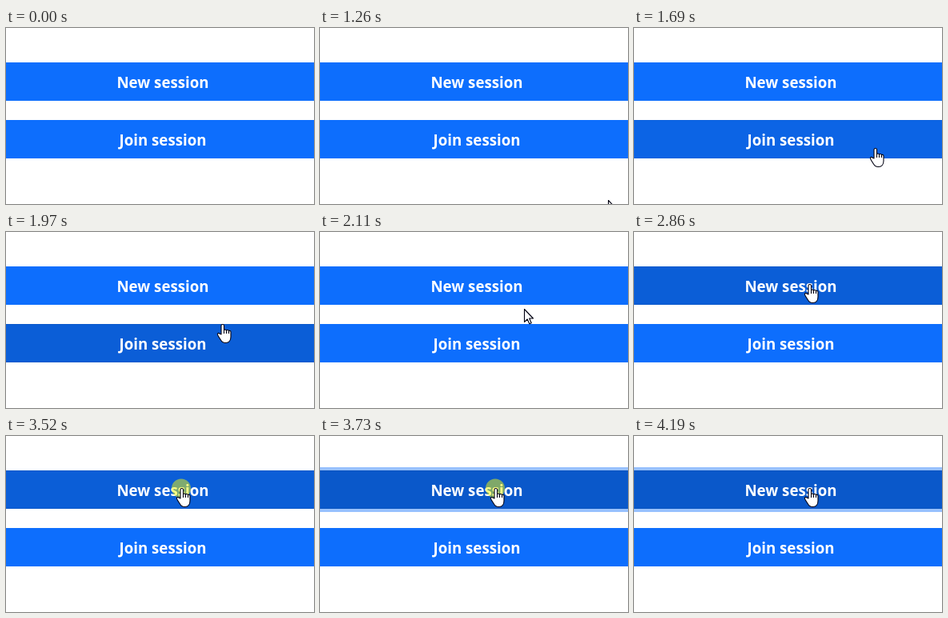
Recreate the animation shown at these times as an HTML page. Size 385 by 220 pixels, loop 4.26 s.

```html
<!DOCTYPE html>
<html lang="en">
<head>
<meta charset="utf-8">
<title>Session buttons</title>
<style>
  html, body { margin: 0; width: 100%; height: 100%; overflow: hidden; background: #fff; }
  svg { display: block; width: 100%; height: 100%; }
  text { font: 700 18.7px "Open Sans", "Noto Sans", sans-serif; fill: #fff; text-anchor: middle; }
  #arrow, #hand { fill: #fff; stroke: #001; stroke-width: 1.1; stroke-linejoin: round; }
</style>
</head>
<body>
<svg viewBox="0 0 385 220">
  <rect id="ring" y="39" width="385" height="56" fill="#98c1fe"/>
  <rect id="create" x="-1" y="43.5" width="387" height="47"/>
  <rect id="join" x="-1" y="115.5" width="387" height="47"/>
  <text x="196" y="75">New session</text>
  <text x="196" y="147">Join session</text>
  <circle id="halo" cx="219" cy="65.5" r="12" fill="#ff0" opacity=".48"/>
  <path id="arrow" d="M.5 .5V16.5L4.2 13L6.8 18.8L9.2 17.8L6.7 12H11.5Z"/>
  <path id="hand" d="M-2 13V2C-2 0 1.5 0 1.5 2V8C1.5 6.5 4.5 6.5 4.5 8.5C4.5 7 7.5 7.2 7.5 9C7.5 8 10 8 10 10V16C10 20.5 7.5 23.5 4 23.5H2.5C-1 23.5 -2 21 -6 14.5C-7.5 12 -5.5 10.5 -4 12ZM1.5 8V12M4.5 8.5V12M7.5 9V12"/>
</svg>
<script>
const LOOP = 4260, STEP = 70, FADE = 150;

// button colours: [fill, border]
const IDLE = [[13, 110, 253], [13, 110, 253]];
const HOVER = [[11, 94, 215], [10, 88, 202]];
const ACTIVE = [[10, 88, 202], [10, 83, 190]];

// [time, x, y]: points of the sweep across both buttons
const sweep = [[1260, 360, 215], [1690, 302, 150], [1760, 295, 143], [2110, 255, 96], [2320, 230, 73]];
// [time, x, y]: positions held until the next entry; y = 220 is off stage
const holds = [[0, 351, 220], [70, 351, 210], [270, 356, 213], [340, 356, 220],
  [2320, 230, 73], [2390, 227, 71], [2450, 225, 70], [2590, 224, 68], [2860, 220, 65]];

const el = id => document.getElementById(id);
const show = (id, on) => el(id).setAttribute("visibility", on ? "visible" : "hidden");
const lerp = (a, b, p) => a + (b - a) * p;
const mix = (a, b, p) => `rgb(${a.map((v, i) => lerp(v, b[i], p))})`;
const fade = (t, start) => 1 - (1 - Math.min(1, Math.max(0, (t - start) / FADE))) ** 2;
const snap = (t, start) => start + Math.floor((t - start) / STEP) * STEP;

function paint(id, from, to, p) {
  ["fill", "stroke"].forEach((name, i) => el(id).setAttribute(name, mix(from[i], to[i], p)));
}

// The screen refreshes in coarse steps while something moves.
function screenTime(t) {
  if (t >= 1260 && t < 2390) return Math.max(1260, snap(t, 10));
  return t >= 3520 ? snap(t, 3520) : t;
}

function pointer(t) {
  if (t < 1260 || t >= 2320) return holds.findLast(h => h[0] <= t).slice(1);
  const i = sweep.findIndex(p => p[0] > t);
  const [t0, x0, y0] = sweep[i - 1], [t1, x1, y1] = sweep[i];
  const p = (t - t0) / (t1 - t0);
  return [lerp(x0, x1, p), lerp(y0, y1, p)].map(Math.round);
}

function draw(time) {
  const t = screenTime(time);
  const [x, y] = pointer(t);
  const over = (y >= 43 && y < 91) || (y >= 115 && y < 163);
  const press = fade(t, 3540);

  paint("join", IDLE, HOVER, fade(t, 1630) - fade(t, 1970));
  if (press) paint("create", HOVER, ACTIVE, press);
  else paint("create", IDLE, HOVER, fade(t, 2180));
  el("ring").setAttribute("opacity", press);
  show("halo", time >= 3520 && time < 4120);
  show("hand", over);
  show("arrow", !over);
  el(over ? "hand" : "arrow").setAttribute("transform", `translate(${x} ${y})`);
}

const origin = performance.now();
function tick() {
  draw((performance.now() - origin) % LOOP);
  requestAnimationFrame(tick);
}
tick();
</script>
</body>
</html>
```
